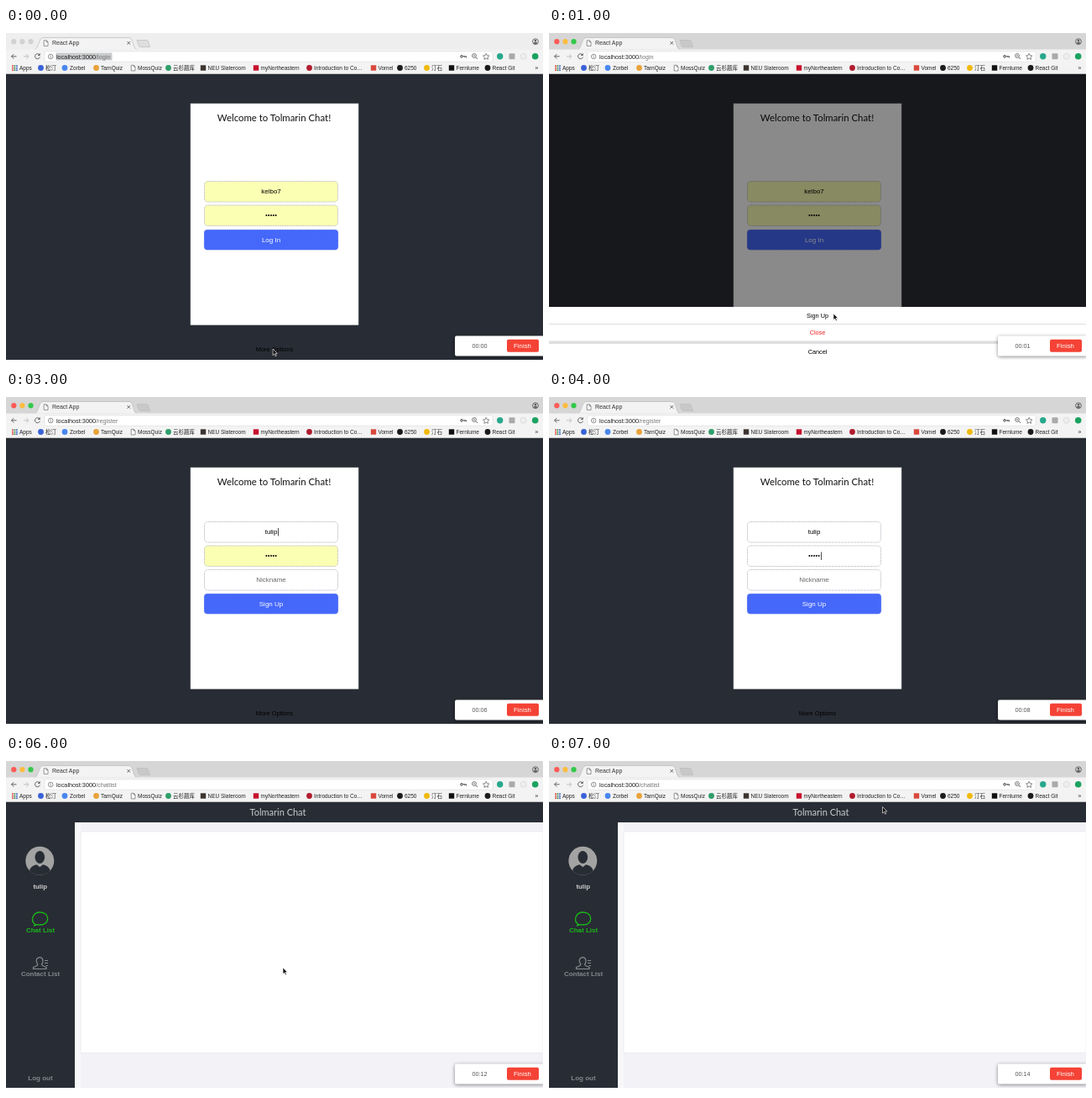
Animation, 640 px wide and 400 px high, one loop 8 s. Source, as an HTML page:

```html
<!DOCTYPE html>
<html lang="en">
<head>
<meta charset="utf-8">
<title>Chat sign-up</title>
<style>
  html, body { margin: 0; width: 100%; height: 100%; overflow: hidden; background: #fff; }
  svg { display: block; width: 640px; height: 400px; }
  text { font-family: "Liberation Sans", "Noto Sans CJK SC", "Noto Sans CJK", sans-serif; white-space: pre; }
  .title { font-family: Lato, sans-serif; }
</style>
</head>
<body>
<svg id="stage" viewBox="0 0 640 400"></svg>
<script>
const STEP = 1000;
const USER = 'tulip', OLD_USER = 'kelbo7', APP = 'Tolmarin Chat';
const DARK = '#282c34', YELLOW = '#fbffb3', BLUE = '#4568fb';

const rect = (x, y, w, h, fill, r = 0, more = '') =>
  `<rect x="${x}" y="${y}" width="${w}" height="${h}" rx="${r}" fill="${fill}" ${more}/>`;
const circle = (x, y, r, fill, more = '') =>
  `<circle cx="${x}" cy="${y}" r="${r}" fill="${fill}" ${more}/>`;
const path = (d, stroke, width = 1, fill = 'none') =>
  `<path d="${d}" stroke="${stroke}" stroke-width="${width}" fill="${fill}"/>`;
const text = (x, y, str, size, fill = '#000', more = '') =>
  `<text x="${x}" y="${y}" font-size="${size}" fill="${fill}" ${more}>${str}</text>`;
const mid = (x, y, str, size, fill, more = '') =>
  text(x, y, str, size, fill, 'text-anchor="middle" ' + more);
const bold = 'font-weight="700"';

// Bookmarks: icon x, icon kind, colour, label x, label
const BOOKMARKS = [
  [41.5, 'o', '#3a62d8', 47, '松汀'],
  [70, 'o', '#4a87ee', 76, 'Zorbel'],
  [107.5, 'o', '#e9a23b', 113, 'TarnQuiz'],
  [151.5, 'page', '', 157, 'MossQuiz'],
  [193.5, 'o', '#2f9e6b', 199, '云杉题库'],
  [235, 's', '#3b3430', 240.5, 'NEU Slateroom'],
  [298, 's', '#c8102e', 303.5, 'myNortheastern'],
  [361.5, 'o', '#b01c2e', 367, 'Introduction to Co…'],
  [438, 's', '#d9483b', 443.5, 'Vomel'],
  [469.5, 'o', '#1b1b1b', 475, '6250'],
  [501.5, 'o', '#f0b90b', 507, '汀石'],
  [531, 's', '#111', 536.5, 'Fernlume'],
  [574, 'o', '#1b1b1b', 579.5, 'React Git'],
];

const pageIcon = (x, y) =>
  path(`M${x - 2.3} ${y - 3.2}h3l1.8 1.8v4.8h-4.8zM${x + .7} ${y - 3.2}v1.8h1.8`, '#666', .7, '#fff');

const icon = (x, kind, color) =>
  kind === 'page' ? pageIcon(x, 47.5)
  : kind === 's' ? rect(x - 3.2, 44.3, 6.4, 6.4, color)
  : circle(x, 47.5, 3.4, color);

function browser(route, active) {
  const lights = active ? ['#fc5b57', '#fdbc40', '#34c84a'] : ['#d2d2d2', '#d2d2d2', '#d2d2d2'];
  let s = rect(0, 6, 640, 20, active ? '#d5d6d5' : '#eeeeee');
  lights.forEach((c, i) => s += circle(9.3 + i * 10.1, 16.2, 3.1, c));
  s += path('M34 25.5C39 25 39 11.5 44 11.5H147C152 11.5 151 25 156 25.5', '#bbb', .7, '#f3f3f3')
    + pageIcon(47.5, 18) + text(55, 20.2, 'React App', 7, '#333')
    + path('M144.5 16l3.6 3.6M148.1 16l-3.6 3.6', '#444', .8)
    + path('M156 14.5h11.5q1.5 0 2 2l2 6h-11q-2 0-2.500-2z', '#bcbcbc', .7, active ? '#c8c8c8' : '#dedede')
    + circle(631, 16.2, 3.4, 'none', 'stroke="#555" stroke-width=".9"')
    + circle(631, 15.2, 1.2, '#555') + rect(629, 16.900, 4, 1.8, '#555', .8);

  s += rect(0, 25.5, 640, 29, '#f3f3f3') + rect(46, 27.8, 534, 12.4, '#fff', 2, 'stroke="#d5d5d5" stroke-width=".5"')
    + path('M12.5 33.800H6.500M9.300 31l-2.800 2.800 2.800 2.800', '#555', .9)
    + path('M21 33.800h6M24.200 31l2.800 2.800-2.800 2.800', '#bdbdbd', .9)
    + path('M40 32a3 3 0 1 0 .4 2.600M40.300 30.300v2.200h-2.200', '#555', .9)
    + circle(53.2, 34, 2.8, 'none', 'stroke="#666" stroke-width=".7"') + path('M53.200 33.600v1.900M53.200 32.200v.7', '#666', .8);
  if (!active) s += rect(59.5, 29.5, 67, 9, '#c9cbcd');
  s += text(60, 36.6, `localhost:3000<tspan fill="#777">${route}</tspan>`, 7.3, '#222');

  s += circle(543, 33.8, 1.3, 'none', 'stroke="#444" stroke-width="1"') + path('M544.500 33.800h4v1.600M546.800 33.800v1.300', '#444', .9)
    + circle(558, 33, 2.4, 'none', 'stroke="#555" stroke-width=".8"') + path('M559.800 34.800l2.200 2.200M557 33h2', '#555', .8)
    + path('M572.200 30.300l1.100 2.400 2.600.3-1.900 1.800.5 2.600-2.300-1.300-2.300 1.300.5-2.600-1.900-1.800 2.600-.3z', '#555', .7)
    + circle(588.7, 33.8, 3.7, '#28a88c')
    + rect(599.5, 30.3, 7, 7, '#aaa', 1)
    + circle(616.6, 33.8, 3.5, '#eee', 'stroke="#d0d0d0" stroke-width=".6"')
    + circle(630.7, 33.8, 3.8, '#1ca261');

  for (let i = 0; i < 9; i++)
    s += rect(7 + i % 3 * 2.5, 44.3 + (i / 3 | 0) * 2.5, 1.8, 1.8, ['#e0564a', '#4b8b5a', '#4a73c9'][i % 3]);
  s += text(16, 49.9, 'Apps', 6.5, '#222');
  for (const [x, kind, color, tx, label] of BOOKMARKS)
    s += icon(x, kind, color) + text(tx, 49.9, label, 6.5, '#222');
  return s + text(630.5, 49.6, '»', 7, '#333') + rect(0, 54, 640, .6, '#bbb');
}

function field(y, str, { fill = '#fff', color = '#000', caret = 0 } = {}) {
  return rect(236.500, y + .5, 159, 24.5, fill, 4, 'stroke="#b9bcc4" stroke-width=".8" stroke-dasharray="2 .7"')
    + mid(316, y + 15.4, str, 8, color)
    + (caret ? rect(caret, y + 8, .7, 9.5, '#000') : '');
}

const dots = (y, fill, caret) => {
  let s = field(y, '', { fill, caret });
  for (let i = 0; i < 5; i++) s += circle(310.4 + i * 2.8, y + 12.6, 1, '#000');
  return s;
};

const card = (fields, button) =>
  rect(0, 54.5, 640, 340.5, DARK)
  + rect(220, 90, 200, 263.500, '#fff', 0, 'stroke="#cfd2d2" stroke-width=".5"')
  + mid(319.5, 111, `Welcome to ${APP}!`, 11.4, '#111', 'class="title"')
  + fields
  + rect(236, 240, 160, 24.3, BLUE, 4, 'stroke="#c4c8d8" stroke-width=".5" stroke-dasharray="2 1"')
  + mid(316, 255.2, button, 8, '#fff')
  + mid(320, 385.4, 'More Options', 7.4, '#000');

const login = () => card(field(182, OLD_USER, { fill: YELLOW }) + dots(210.5, YELLOW), 'Log In');

const register = (name, pass, nick) => card(name + pass + nick, 'Sign Up');

const placeholder = () => field(211, 'Nickname', { color: '#666' });

const sheet = () =>
  rect(0, 54.5, 640, 278, '#000', 0, 'opacity=".46"')
  + rect(0, 332, 640, 63, '#fff') + rect(0, 352, 640, .8, '#d8d8d8') + rect(0, 372.500, 640, 3.5, '#dedee1')
  + mid(320, 345.2, 'Sign Up', 7.3) + mid(320, 365.2, 'Close', 7.3, '#f02020') + mid(320, 387.6, 'Cancel', 7.3);

function suggestions() {
  let s = rect(236.5, 178.700, 159, 73, '#fff', 0, 'stroke="#a3b7d6" stroke-width=".8"');
  ['7', '', 1, 2, 3, 4].forEach((n, i) => s += text(240.5, 188 + i * 12, 'kelbo' + n, 7, '#000', bold));
  return s + path('M304.500 170.200h23', '#e03020', .9);
}

const composer = () =>
  path('M308 227.900h17', '#000', .7)
  + rect(317.5, 230.500, 165.5, 28, '#080a0c', 1, 'opacity=".86"')
  + text(324, 240.3, USER, 7.8, '#a9d8e6') + rect(340.6, 233.5, .7, 8.500, '#4cc3f0')
  + ['1.' + USER, '2.合理', '3.喝了', '4.河流', '5.荷兰']
    .map((w, i) => text(324 + i * 29, 253.3, w, 8, i ? '#d8d8d8' : '#9fc9e8')).join('')
  + path('M473.300 250l-2 2.200 2 2.200', '#ccc', 1) + path('M476.500 250l2.200 2.200-2.200 2.200z', '#5cc8ee', .8, '#5cc8ee');

const chatList = () =>
  rect(0, 54.5, 640, 340.5, '#f2f2f7') + rect(82, 79, 7, 316, '#f8f8fa')
  + rect(89, 90, 551, 263.500, '#fff', 0, 'stroke="#e4e4e9" stroke-width=".6"')
  + rect(0, 54.5, 640, 24.5, DARK) + rect(0, 79, 82, 316, DARK)
  + mid(324, 71.2, APP, 11, '#c9cbcf', 'class="title"')
  + circle(40.3, 124.7, 17, '#a3a3a3')
  + path('M28 136.500q1.500-6 8.500-7.200l3.800 3 3.800-3q7 1.200 8.500 7.200a17 17 0 0 1-24.600 0z', 'none', 0, DARK)
  + `<ellipse cx="40.3" cy="120.500" rx="5.8" ry="7.6" fill="${DARK}"/>`
  + mid(40.7, 157.6, USER, 7.8, '#d0d0d0', bold)
  + path('M35 200.500c-7-5-2.500-14.500 5.500-14.500 12 0 12.500 15 0 15q-1.500 0-3-.4l-4.500 1.600z', '#1aba1a', 1.300)
  + mid(41, 209.8, 'Chat List', 8, '#1aba1a', bold)
  + path('M37 246.500c-4-7 7.500-10 7-2q-.3 2.500-1.600 3.500 .3 1.500 5.600 3.500v2H32.500v-2q5-1.500 5.300-3.500zM46 243.500h4M46 246.500h4M47.500 249.500h2.500', '#888b90', 1.200)
  + mid(41, 262, 'Contact List', 8, '#84878c', bold)
  + mid(41, 385.600, 'Log out', 8, '#84878c', bold);

const arrow = (x, y) =>
  path(`M${x} ${y}v7.6l1.800-1.700 1.300 2.800 1.200-.6-1.300-2.700h2.400z`, '#fff', .6, '#111');

const beam = (x, y) =>
  circle(x, y, 8.6, 'none', 'stroke="#222" stroke-width="1.1"')
  + path(`M${x - 1.5} ${y - 3.500}q1.500 0 1.500 1v5q0 1-1.500 1m3 0q-1.500 0-1.500-1v-5q0-1 1.500-1`, '#222', .8);

const recorder = time =>
  rect(535, 366.500, 107, 24, '#fff', 2, 'style="filter:drop-shadow(0 1px 2px #0007)"')
  + mid(564.5, 381, time, 7.2, '#555')
  + rect(597, 370.8, 38, 15, '#f44336', 2) + mid(615.5, 381.2, 'Finish', 7.8, '#fff');

// Route, recorder clock, page content, pointer
const named = caret => field(154, USER, { caret });
const SCENES = [
  ['/login', '00:00', login, () => arrow(318, 382)],
  ['/login', '00:01', () => login() + sheet(), () => arrow(339, 340)],
  ['/register', '00:03', () => register(field(154, OLD_USER, { fill: YELLOW }), '', '') + suggestions(), () => beam(297, 165)],
  ['/register', '00:06', () => register(named(324.3), dots(182.5, YELLOW), placeholder())],
  ['/register', '00:08', () => register(named(), dots(182.5, '#fff', 324), placeholder())],
  ['/register', '00:10', () => register(named(), dots(182.5, '#fff'), field(211, USER)) + composer()],
  ['/chatlist', '00:12', chatList, () => arrow(330, 252)],
  ['/chatlist', '00:14', chatList, () => arrow(397.5, 60.5)],
];

const stage = document.getElementById('stage');
const start = performance.now();
let shown = -1;

function tick() {
  const i = Math.floor((performance.now() - start) / STEP) % SCENES.length;
  if (i !== shown) {
    shown = i;
    const [route, time, page, pointer] = SCENES[i];
    stage.innerHTML = page() + browser(route, i > 0) + recorder(time)
      + (pointer ? pointer() : '') + rect(0, 395, 640, 5, '#fff');
  }
  requestAnimationFrame(tick);
}
tick();
</script>
</body>
</html>
```
